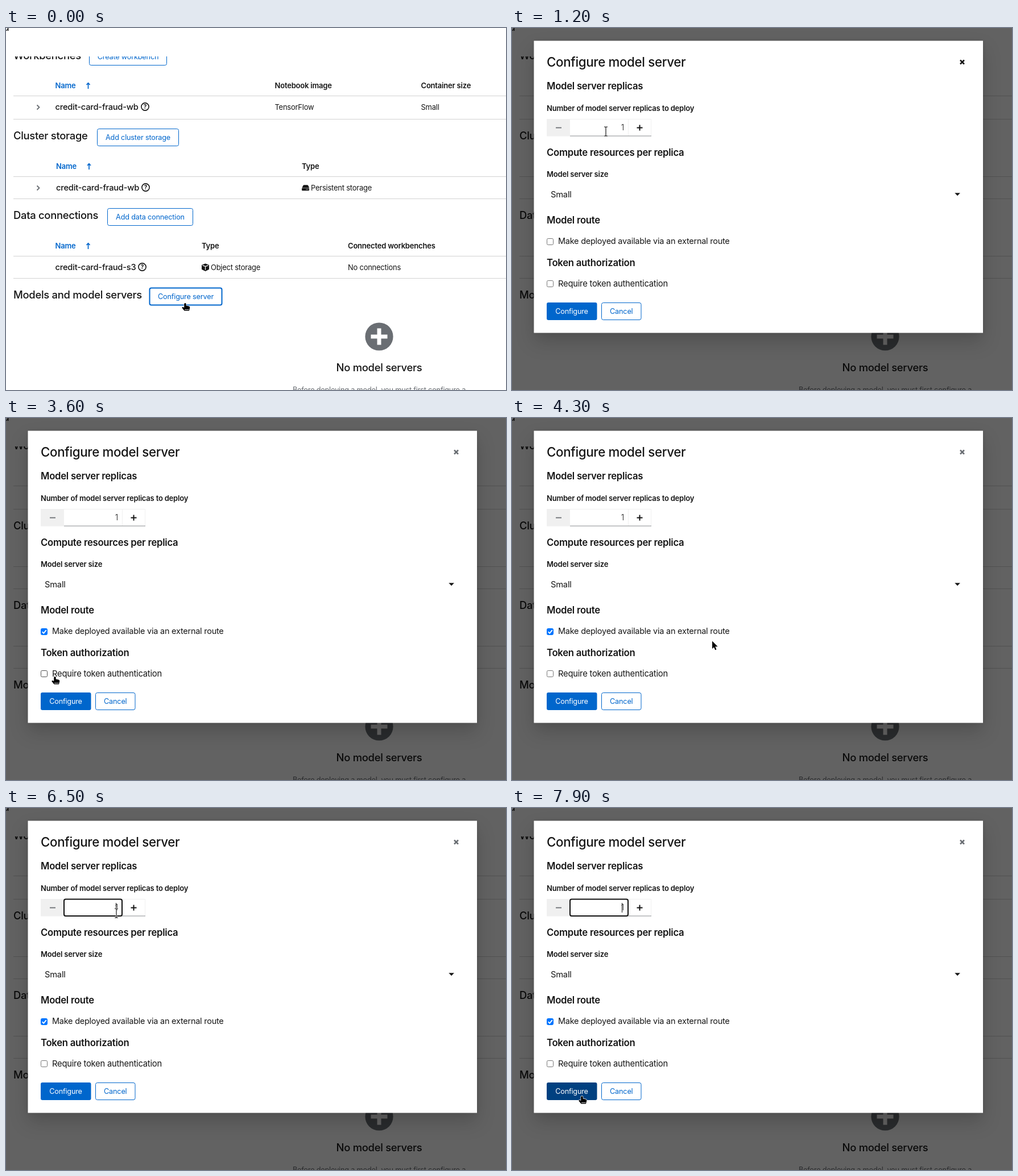
An HTML page for the animation above (8000 ms loop, 879x637 px).

```html
<!DOCTYPE html>
<html lang="en">
<head>
<meta charset="utf-8">
<title>Configure model server</title>
<style>
html, body { margin: 0; width: 100%; height: 100%; overflow: hidden; background: #fff; }
svg { display: block; }
text { font-family: Inter, "Open Sans", sans-serif; letter-spacing: -.015em; font-optical-sizing: none; white-space: pre; }
.dialog { filter: drop-shadow(0 16px 16px rgba(3, 3, 3, .16)) drop-shadow(0 0 4px rgba(3, 3, 3, .1)); }
</style>
</head>
<body>
<svg id="stage" width="879" height="637" viewBox="0 0 879 637"></svg>
<script>
const INK = '#151515', BLUE = '#0066cc', GREY = '#6a6e73', LINE = '#d2d2d2';

const text = (x, y, s, size, weight = 400, fill = INK, anchor = 'start') =>
  `<text x="${x}" y="${y}" font-size="${size}" font-weight="${weight}" fill="${fill}" text-anchor="${anchor}">${s}</text>`;
const rect = (x, y, w, h, attrs) => `<rect x="${x}" y="${y}" width="${w}" height="${h}" ${attrs}/>`;
const path = (d, attrs = '') => `<path d="${d}" ${attrs}/>`;
const stroke = (color, width) => `fill="none" stroke="${color}" stroke-width="${width}"`;

const heading = (y, s) => text(13, y, s, 18.4, 450);
const header = (x, y, s, fill) => text(x, y, s, 13, 600, fill);
const cell = (x, y, s) => text(x, y, s, 12.9);
const rule = y => path(`M13 ${y}H879`, stroke(LINE, 1));
const chevron = y => path(`M54.5 ${y - 4}l4 4l-4 4`, stroke(GREY, 1.8));
const button = (x, y, w, s, width = 1) =>
  rect(x + .5, y + .5, w - 1, 30, `rx="3" ${stroke(BLUE, width)}`) +
  text(x + w / 2, y + 19.5, s, 12.7, 400, BLUE, 'middle');
const sortName = (x, y) => header(x, y, 'Name', BLUE) +
  path(`M${x + 58} ${y + 1}v-10m-3 3l3 -3.2l3 3.2`, stroke(BLUE, 1.7));
const rowName = (x, y, s, helpX) => text(x, y, s, 14.7, 450) +
  `<circle cx="${helpX}" cy="${y - 5.5}" r="6.6" ${stroke(INK, 1.6)}/>` +
  text(helpX, y - 2, '?', 10, 700, INK, 'middle');

const page = `
  ${text(5.5, 5, 'd', 18.5, 400, INK, 'end')}
  <clipPath id="below"><rect y="50" width="879" height="587"/></clipPath>
  <g clip-path="url(#below)">
    ${heading(55, 'Workbenches')}${button(146, 35, 137, 'Create workbench')}
    ${sortName(86.5, 106)}${header(472.5, 106, 'Notebook image')}${header(729.5, 106, 'Container size')}
    ${rule(119.5)}${chevron(139.5)}${rowName(86.5, 144, 'credit-card-fraud-wb', 244.5)}
    ${cell(472.5, 144, 'TensorFlow')}${cell(729.5, 144, 'Small')}${rule(160.5)}

    ${heading(196, 'Cluster storage')}${button(160, 177, 144, 'Add cluster storage')}
    ${sortName(88, 248)}${header(520, 248, 'Type')}
    ${rule(261.5)}${chevron(281.5)}${rowName(88, 286, 'credit-card-fraud-wb', 245.5)}
    ${path('M520.5 281l2 -4q.4 -.8 1.3 -.8h6q.9 0 1.3 .8l2 4z', `fill="${INK}"`)}
    ${rect(520, 281.6, 13, 4.6, `rx="1.3" fill="${INK}"`)}
    ${path('M527.5 284h1.4m1 0h1.4', stroke('#fff', 1.2))}
    ${cell(536, 286, 'Persistent storage')}${rule(300.5)}

    ${heading(336, 'Data connections')}${button(178, 317, 151, 'Add data connection')}
    ${sortName(86.5, 388)}${header(344, 388, 'Type')}${header(601, 388, 'Connected workbenches')}
    ${rule(401.5)}${rowName(86.5, 426, 'credit-card-fraud-s3', 239.5)}
    ${path('M350.5 414.5l6.5 2.6v7.6l-6.5 3.3l-6.5 -3.3v-7.6z', `fill="${INK}"`)}
    ${path('M345.5 417.6l5 2l5 -2m-5 2.2v6', stroke('#fff', 1.2))}
    ${cell(360, 426, 'Object storage')}${cell(601, 426, 'No connections')}${rule(440.5)}

    ${heading(476, 'Models and model servers')}${button(252, 457, 128, 'Configure server', 2)}
    <circle cx="656" cy="543" r="24.6" fill="${GREY}"/>
    ${path('M645 543h22M656 532v22', 'stroke="#fff" stroke-width="7" stroke-linecap="square"')}
    ${text(656, 604, 'No model servers', 18.4, 500, INK, 'middle')}
    ${text(656, 641, 'Before deploying a model, you must first configure a', 12.7, 400, GREY, 'middle')}
  </g>`;

const section = (y, s) => text(61, y, s, 16.7, 600);
const label = (y, s) => text(61, y, s, 13, 600);
const checkbox = (id, y) => rect(61.5, y + .5, 11, 11, `id="${id}" rx="2" fill="#fff" stroke="#767676"`);

const modal = `<g id="modal">
  ${rect(0, 0, 879, 637, 'fill="#030303" opacity=".62"')}
  ${rect(38.5, 22.5, 789.5, 514, 'fill="#fff" class="dialog"')}
  ${text(61, 68, 'Configure model server', 22.3, 450)}
  ${path('M788 56.5l7 7m0 -7l-7 7', 'id="close" stroke-width="2.5"')}
  ${section(108, 'Model server replicas')}${label(146, 'Number of model server replicas to deploy')}
  ${rect(61, 160, 41, 30.5, 'fill="#f0f0f0"')}
  ${path('M77 175.5h10', stroke(GREY, 1.8))}
  ${path('M102 160.5H244.5V190M204.5 160V190', stroke('#f0f0f0', 1))}
  ${path('M102 190H245', stroke('#8a8d90', 1))}
  ${path('M219.5 175.5h10m-5 -5v10', stroke(INK, 2))}
  ${rect(102, 160.5, 102, 29.5, 'id="focus" rx="3" fill="#fff" stroke="#101010" stroke-width="2"')}
  ${text(197, 180, '1', 13.8, 300, INK, 'end')}
  ${path('M193.5 167v17', 'id="caret" stroke="#151515"')}
  ${section(224.5, 'Compute resources per replica')}${label(262, 'Model server size')}
  ${text(68, 298, 'Small', 14.7)}
  ${path('M778.3 290.3h9.6l-4.8 5z', `fill="${INK}"`)}
  ${section(344, 'Model route')}${checkbox('route', 370)}
  ${path('M63.7 376.2l2.5 2.6l4.6 -5.6', `id="tick" ${stroke('#fff', 1.9)}`)}
  ${text(81, 380, 'Make deployed available via an external route', 14.45)}
  ${section(419, 'Token authorization')}${checkbox('token', 444)}
  ${text(81, 455, 'Require token authentication', 14.75)}
  ${rect(61, 483, 88.5, 31, 'id="submit" rx="3"')}
  ${text(105, 502.5, 'Configure', 12.7, 400, '#fff', 'middle')}
  ${button(157, 483, 70.5, 'Cancel')}
</g>`;

// Cursor shapes are drawn around their hot spot.
const outlined = 'fill="#000" stroke="#fff" stroke-width="1.4" paint-order="stroke" stroke-linejoin="round"';
const cursors = `<g id="cursor">
  <g id="arrow">${path('M0 .5V14L3 11.2L5.2 16.3L7.4 15.4L5.3 10.3H9.6Z', outlined)}</g>
  <g id="hand">${path('M-1.8 1.5Q-1.5 0 0 0Q1.6 0 1.7 1.5V4.5L6.5 5.5Q8.5 6 8.3 8.2L7 13.5H-1.5L-5.5 8.6Q-6 6.8 -4 7L-1.8 8Z', outlined)}
    ${path('M-1 11.5h7.5', stroke('#fff', .8))}</g>
  <g id="beam">${['#fff', '#000'].map((c, i) =>
    path('M-3 -8H-1Q0 -8 0 -7V7Q0 8 -1 8H-3M3 -8H1Q0 -8 0 -7M0 7Q0 8 1 8H3', stroke(c, i ? 1.1 : 2.6))).join('')}</g>
</g>`;

document.getElementById('stage').innerHTML = page + modal + cursors;
const $ = id => document.getElementById(id);
const show = (id, on) => $(id).setAttribute('visibility', on ? 'visible' : 'hidden');
const set = (id, name, value) => $(id).setAttribute(name, value);

// time, x, y, cursor shape from that time on
const track = [
  [0, 315, 484, 'hand'], [300, 315, 484, 'arrow'], [600, 315, 484, 'arrow'],
  [1000, 225, 245, 'arrow'], [1100, 198, 162, 'beam'], [1200, 165, 182, 'beam'],
  [1300, 150, 230, 'arrow'], [1500, 132.5, 333, 'beam'], [1600, 115, 345, 'arrow'],
  [2000, 73, 375, 'arrow'], [2600, 73, 375, 'arrow'], [2700, 71, 376, 'hand'],
  [3000, 69, 377, 'hand'], [3500, 69, 377, 'hand'], [3600, 86, 455, 'hand'],
  [3700, 110, 486, 'hand'], [3800, 152, 497, 'arrow'], [3900, 200, 488, 'hand'],
  [4000, 250, 460, 'arrow'], [4300, 352, 392, 'arrow'], [4600, 352, 392, 'arrow'],
  [5000, 225, 101, 'arrow'], [5200, 150, 250, 'arrow'], [5400, 92, 455, 'hand'],
  [5500, 78, 445, 'hand'], [5600, 100, 400, 'arrow'], [5900, 238, 178, 'hand'],
  [6000, 220, 172, 'hand'], [6100, 203, 180, 'beam'], [6200, 194, 185, 'beam'],
  [6800, 194, 185, 'beam'], [7000, 212, 184, 'hand'], [7100, 208, 225, 'arrow'],
  [7600, 132, 490, 'hand'], [7700, 122, 505, 'hand'], [7900, 123, 507, 'hand']
];

function cursorAt(t) {
  const i = track.findLastIndex(k => k[0] <= t);
  const [t0, x0, y0, shape] = track[i];
  const [t1, x1, y1] = track[i + 1] || [t0 + 1, x0, y0];
  const p = Math.min(1, (t - t0) / (t1 - t0));
  return { x: x0 + (x1 - x0) * p, y: y0 + (y1 - y0) * p, shape };
}

function draw(now) {
  const t = Math.floor(now % 8000 / 100) * 100;
  const { x, y, shape } = cursorAt(t);
  const over = (l, top, r, b) => x >= l && x <= r && y >= top && y <= b;
  const open = t >= 300, checked = t >= 3200, focused = t >= 6500;
  const onRoute = over(61, 369, 382, 382) && shape === 'hand';
  const onToken = over(61, 443, 274, 457) && shape === 'hand';

  $('modal').style.display = open ? '' : 'none';
  set('close', 'stroke', t < 2400 ? INK : GREY);
  const routeFill = t === 3200 ? '#3793ff' : onRoute ? '#005cc8' : '#0075ff';
  set('route', 'fill', checked ? routeFill : '#fff');
  set('route', 'stroke', checked ? routeFill : onRoute ? '#4f4f4f' : '#767676');
  set('token', 'stroke', onToken ? '#4f4f4f' : '#767676');
  set('submit', 'fill', over(61, 483, 149, 514) ? '#004080' : BLUE);
  show('tick', open && checked);
  show('focus', focused);
  show('caret', focused && (t < 7200 || t >= 7800));
  for (const id of ['arrow', 'hand', 'beam']) show(id, id === shape);
  set('cursor', 'transform', `translate(${x} ${y})`);
  requestAnimationFrame(loop);
}

const start = performance.now();
function loop() { draw(performance.now() - start); }
loop();
</script>
</body>
</html>
```
